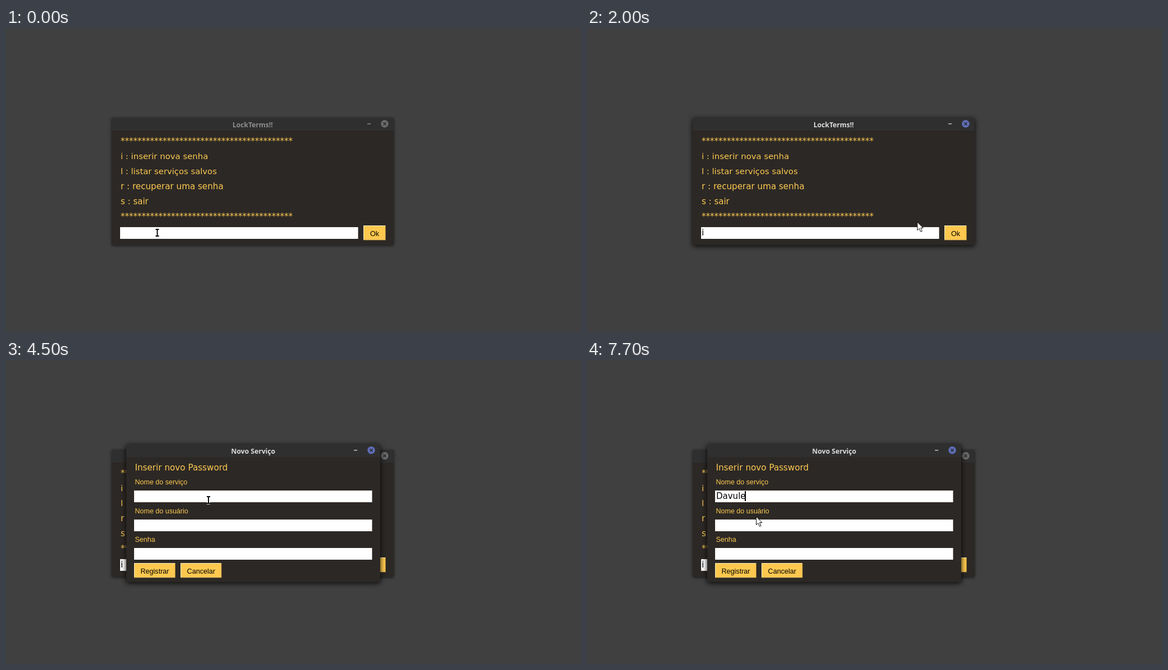
Animation, 1028 px wide and 545 px high, one loop 8 s. Source, as an HTML page:

```html
<!DOCTYPE html>
<html lang="pt">
<head>
<meta charset="utf-8">
<title>Senhas</title>
<style>
  html, body { margin: 0; width: 100%; height: 100%; overflow: hidden; background: #404040; }
  svg { display: block; width: 100vw; height: 100vh; }
  text { white-space: pre; }
  .frame { fill: #2c2825; filter: drop-shadow(0 1px 2.5px rgba(0, 0, 0, .65)); }
  .bar { fill: #2f2f2f; }
  .title { font: 600 12.2px "Noto Sans", sans-serif; text-anchor: middle; fill: #8e8e8e; }
  .dash { fill: #8e8e8e; }
  .close { fill: #6b6b6b; }
  .cross { stroke: #2b2b2b; stroke-width: 1.5; }
  .focus .frame { filter: drop-shadow(0 2px 5px rgba(0, 0, 0, .9)); }
  .focus .title { fill: #dcdcdc; }
  .focus .dash { fill: #c4c4c4; }
  .focus .close { fill: #5f6eb8; }
  .big { font: 15px "DejaVu Sans", sans-serif; fill: #fdca52; }
  .small { font: 12.5px "Liberation Sans", Arial, sans-serif; fill: #fdca52; }
  .typed { font: 15px "DejaVu Sans", sans-serif; fill: #000; }
  .key { font: 12.6px "Liberation Sans", Arial, sans-serif; text-anchor: middle; fill: #000; }
</style>
</head>
<body>
<svg id="stage" viewBox="0 0 1028 545" preserveAspectRatio="none"></svg>
<script>
const LOOP = 8000;
const stage = document.getElementById("stage");

function add(parent, tag, attrs, text) {
  const el = document.createElementNS("http://www.w3.org/2000/svg", tag);
  for (const k in attrs) el.setAttribute(k, attrs[k]);
  if (text) el.textContent = text;
  parent.appendChild(el);
  return el;
}

const rect = (p, x, y, width, height, fill) => add(p, "rect", { x, y, width, height, fill });
const show = (el, on) => el.setAttribute("visibility", on ? "visible" : "hidden");

function label(p, cls, x, y, text, size) {
  const el = add(p, "text", { class: cls, x, y }, text);
  if (size) el.style.fontSize = size + "px";
  return el;
}

function makeWindow(x, y, w, h, title) {
  const g = add(stage, "g", {});
  add(g, "rect", { class: "frame", x, y, width: w, height: h, rx: 2 });
  add(g, "path", { class: "bar", d: `M${x} ${y + 23}v-21q0-2 2-2h${w - 4}q2 0 2 2v21z` });
  label(g, "title", x + w / 2, y + 16.5, title);
  add(g, "rect", { class: "dash", x: x + w - 47, y: y + 10, width: 6, height: 1.5 });
  const cx = x + w - 16, cy = y + 10.7;
  add(g, "circle", { class: "close", cx, cy, r: 6.8 });
  add(g, "path", { class: "cross", d: `M${cx - 2.5} ${cy - 2.5}l5 5m0-5l-5 5` });
  return g;
}

const field = (p, x, y) => rect(p, x, y, 425.5, 21, "#fff");

function button(p, x, y, w, text) {
  const h = 26.5;
  rect(p, x, y, w, h, "#a57d2f");
  rect(p, x, y, w - 1, h - 1, "#fff0c4");
  rect(p, x + 1, y + 1, w - 2, h - 2, "#fec84f");
  label(p, "key", x + w / 2, y + 18.5, text);
}

// A text line with a blinking caret that follows its end
function entry(p, x, y) {
  const text = label(p, "typed", x, y, "");
  const caret = rect(p, x, y - 14, 2, 18, "#000");
  return (value, on) => {
    text.textContent = value;
    const w = value ? text.getComputedTextLength() : 0;
    caret.setAttribute("x", Math.floor(x + w) - 1);
    show(caret, on);
  };
}

const menu = makeWindow(189, 161, 504, 228, "LockTerms!!");
const stars = "*".repeat(41);
[[stars], ["i : inserir nova senha", 14.9], ["l : listar serviços salvos", 14.8],
 ["r : recuperar uma senha", 15.15], ["s : sair"], [stars]]
  .forEach(([text, size], i) => label(menu, "big", 205, 208 + 27 * i, text, size));
field(menu, 204, 357);
button(menu, 639, 354, 40, "Ok");
const setChoice = entry(menu, 205, 372);

const form = makeWindow(215, 151, 454, 247, "Novo Serviço");
label(form, "big", 230.5, 198, "Inserir novo Password", 15.2);
["Nome do serviço", "Nome do usuário", "Senha"].forEach((text, i) => {
  label(form, "small", 230.5, Math.floor(223.5 + 51.5 * i), text);
  field(form, 229, Math.round(234 + 51.5 * i));
});
button(form, 229, 364, 74, "Registrar");
button(form, 312, 364, 73.5, "Cancelar");
const setService = entry(form, 231, 249);

const beam = add(stage, "g", { fill: "none" });
for (const [stroke, width] of [["#fff", 3.6], ["#000", 1.9]]) {
  add(beam, "path", {
    d: "M-3-6h2q1 0 1 1q0-1 1-1h2M0-5v10M-3 6h2q1 0 1-1q0 1 1 1h2",
    stroke, "stroke-width": width
  });
}
const arrow = add(stage, "path", {
  d: "M.6.9v14.7l3.4-3.2 2.5 5.8 2.6-1.1-2.5-5.6h4.4z",
  fill: "#fff", stroke: "#111", "stroke-width": 1
});

// Pointer: time, shape, x, y
const pointer = [
  [0, "beam", 270.5, 367], [1600, "beam", 331, 364], [1700, "beam", 395, 358],
  [1800, "arrow", 460, 349], [1900, "arrow", 530, 345], [2000, "arrow", 590, 347],
  [2100, "arrow", 628, 353], [2200, "arrow", 648, 360], [2300, "arrow", 659, 363],
  [3100, "arrow", 452, 361], [3300, "beam", 352, 351], [3600, "arrow", 361, 271],
  [3900, "beam", 362, 251], [7700, "arrow", 302, 280]
];
// Caret: time, visible
const blink = [
  [0, 0], [500, 1], [1100, 0], [1400, 1], [2000, 0], [2300, 1], [3600, 0], [4200, 1],
  [4500, 0], [5000, 1], [5500, 0], [5700, 1], [6500, 0], [6800, 1], [7400, 0], [7700, 1]
];
const service = "Davule";
const keyTimes = [5500, 6000, 6200, 6800, 7100, 7400];

const latest = (list, t) => list.filter(item => item[0] <= t).pop();

function draw(t) {
  const formOpen = t >= 3100;
  const caretOn = latest(blink, t)[1];
  menu.setAttribute("class", t >= 500 && !formOpen ? "focus" : "");
  form.setAttribute("class", "focus");
  form.style.display = formOpen ? "" : "none";
  setChoice(t >= 1100 ? "i" : "", caretOn && !formOpen);
  if (formOpen) setService(service.slice(0, keyTimes.filter(k => k <= t).length), caretOn);
  else setService("", false);

  const [, shape, x, y] = latest(pointer, t);
  const active = shape === "beam" ? beam : arrow;
  show(beam, active === beam);
  show(arrow, active === arrow);
  active.setAttribute("transform", `translate(${x} ${y})`);
}

const start = performance.now();
function tick() {
  draw((performance.now() - start) % LOOP);
  requestAnimationFrame(tick);
}
tick();
</script>
</body>
</html>
```
